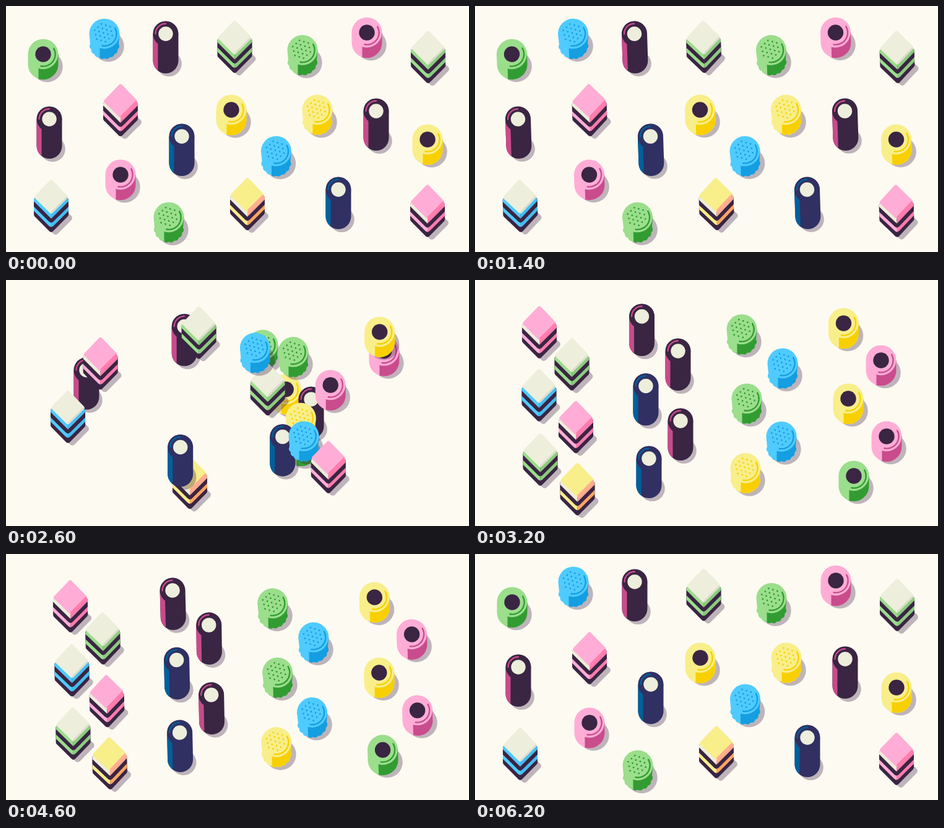
Animation, 748 px wide and 398 px high, one loop 6300 ms. Source, as an HTML page with a canvas:

```html
<!DOCTYPE html>
<html lang="en">
<head>
<meta charset="utf-8">
<title>Sorting sweets</title>
<style>
html, body { margin: 0; width: 100%; height: 100%; overflow: hidden; background: #fdfaf1; }
canvas { display: block; }
</style>
</head>
<body>
<canvas id="stage" width="748" height="398"></canvas>
<script>
const ctx = document.getElementById('stage').getContext('2d');
const LOOP = 6300, STEP = 100, MOVE = 500, GATHER = 2240, SCATTER = 5580, SWING = 767;
const TAU = Math.PI * 2;
const INK = '#3a2543', CREAM = '#edeedb', SHADOW = 'rgba(62,38,74,0.33)';

// Round sweets: [light, dark]
const TINT = {
  green: ['#9bde8c', '#329c32'],
  blue: ['#4fcbff', '#159ee0'],
  pink: ['#ffadd6', '#c94c8c'],
  yellow: ['#f8ee8a', '#f8d000']
};
// Tubes: [body, side]
const TUBE = { black: [INK, '#c84b8c'], navy: ['#303062', '#00609c'] };
// Cubes: top, bevel, first layer left/right, second layer left/right
const CUBE = {
  green: [CREAM, '#dcdccb', '#9bde8c', '#8ccb7e', '#9bde8c', '#8ccb7e'],
  blue: [CREAM, '#dcdccb', '#4fcbff', '#45bdf2', '#4fcbff', '#45bdf2'],
  pink: ['#ffadd6', '#ff7bac', CREAM, '#ff7bac', '#ffadd6', '#ff7bac'],
  yellow: ['#f8ee8a', '#ffab90', CREAM, '#ffab90', '#f8ee8a', '#ffa562']
};

// Back to front: draw, colour, scattered x y, sorted x y, lag, optional drift x y
const sweets = [
  [wheel, 'green', 60, 78, 607, 317, 55, 5, 0],
  [wheel, 'yellow', 364, 168, 603, 192, 134],
  [tube, 'black', 598, 170, 332, 228, 129],
  [wheel, 'pink', 583, 43, 665, 253, 140],
  [wheel, 'yellow', 681, 216, 595.5, 70, 4],
  [cube, 'yellow', 390, 306, 169, 324, 124, -3.5, 0],
  [bobble, 'green', 263, 342, 431, 80, 4],
  [tube, 'black', 258, 45, 328, 115, 122],
  [tube, 'black', 70, 183, 269.5, 59, 149],
  [bobble, 'yellow', 503, 168, 437, 304.5, 127],
  [tube, 'navy', 537, 297, 276, 171.5, 139],
  [tube, 'navy', 284, 211, 281, 289, 55],
  [cube, 'green', 682, 68, 110.5, 276, 118, -5, 0],
  [bobble, 'blue', 436.5, 235, 495, 258.5, 55, 0, -5],
  [bobble, 'blue', 159, 45, 497, 135, 66],
  [bobble, 'green', 479, 71.5, 439, 192, 133],
  [wheel, 'pink', 185, 273, 656, 130, 66],
  [cube, 'pink', 185, 154, 104, 70, 128],
  [cube, 'pink', 681, 317, 163, 223.5, 147],
  [cube, 'green', 369.5, 51.5, 156.5, 122, 156],
  [cube, 'blue', 73, 309, 108.5, 175, 55, -5, -3]
];

const clamp = v => Math.min(1, Math.max(0, v));
const ease = v => v < 0.5 ? 4 * v ** 3 : 1 - 4 * (1 - v) ** 3;

function disc(x, y, r, fill) {
  ctx.fillStyle = fill;
  ctx.beginPath();
  ctx.arc(x, y, r, 0, TAU);
  ctx.fill();
}

function arc(r, from, to, color, width) {
  ctx.strokeStyle = color;
  ctx.lineWidth = width;
  ctx.lineCap = 'round';
  ctx.beginPath();
  ctx.arc(0, 0, r, from, to);
  ctx.stroke();
}

function rounded(points, radius, fill) {
  const last = points[points.length - 1];
  ctx.beginPath();
  ctx.moveTo((last[0] + points[0][0]) / 2, (last[1] + points[0][1]) / 2);
  points.forEach((p, i) => {
    const next = points[(i + 1) % points.length];
    ctx.arcTo(...p, (p[0] + next[0]) / 2, (p[1] + next[1]) / 2, radius);
  });
  ctx.closePath();
  ctx.fillStyle = fill;
  ctx.fill();
}

function capsule(r, base) {
  ctx.beginPath();
  ctx.arc(0, 0, r, Math.PI, TAU);
  ctx.arc(0, base, r, 0, Math.PI);
  ctx.closePath();
}

// Same outline with a bumpy lower rim
function bumpyCapsule(r, base) {
  ctx.beginPath();
  ctx.arc(0, 0, r, Math.PI, TAU);
  for (let i = 0; i <= 72; i++) {
    const a = i / 72 * Math.PI;
    const rim = r - 1.5 + 1.5 * Math.abs(Math.sin(a * 8));
    ctx.lineTo(Math.cos(a) * rim, base + Math.sin(a) * rim);
  }
  ctx.closePath();
}

function drum(outline, [light, dark]) {
  disc(6.5, 20, 25.2, SHADOW);
  ctx.save();
  outline(24.5, 16.5);
  ctx.fillStyle = light;
  ctx.fill();
  ctx.clip();
  ctx.fillStyle = dark;
  ctx.fillRect(-7.5, 0, 40, 50);
  disc(0, 0, 24.2, light);
  ctx.restore();
  arc(19.6, -0.5, 1.75, dark, 2.4);
}

function wheel(color) {
  drum(capsule, TINT[color]);
  disc(0, 0, 12.7, INK);
}

function bobble(color) {
  drum(bumpyCapsule, TINT[color]);
  ctx.save();
  ctx.translate(-1.5, -1.5);
  ctx.rotate(0.3);
  for (let row = -3; row <= 3; row++) {
    for (let col = -3; col <= 3; col++) {
      const x = (col + row % 2 / 2) * 7.4, y = row * 6.4;
      if (Math.hypot(x, y) < 18) disc(x, y, 1.4, TINT[color][1]);
    }
  }
  ctx.restore();
}

function tube(color) {
  const [body, side] = TUBE[color];
  disc(5.3, 48.5, 20.5, SHADOW);
  ctx.save();
  capsule(20.5, 43.5);
  ctx.fillStyle = body;
  ctx.fill();
  ctx.clip();
  ctx.fillStyle = side;
  ctx.fillRect(-21, 0, 8.5, 70);
  disc(0, 0, 20.5, body);
  ctx.restore();
  arc(16.5, Math.PI, Math.PI * 1.5, side, 2.3);
  disc(0, 0, 11.7, CREAM);
}

// Half of a layer: a slanted band that bends softly at the middle
function layer(side, top, bottom, fill) {
  ctx.fillStyle = fill;
  ctx.beginPath();
  ctx.moveTo(0, 26 + top);
  ctx.lineTo(side, top - 2);
  ctx.lineTo(side, bottom);
  ctx.lineTo(side * 0.14, 24 + bottom);
  ctx.quadraticCurveTo(side * 0.07, 26 + bottom, 0, 26 + bottom);
  ctx.fill();
}

function cube(color) {
  const [top, bevel, ...layers] = CUBE[color];
  const w = 28;
  rounded([[7, 5], [36, 34], [7, 63], [-22, 34]], 5, SHADOW);
  ctx.save();
  rounded([[-w, 1], [w, 1], [w, 30], [0, 58.5], [-w, 30]], 4, INK);
  ctx.clip();
  layers.forEach((fill, i) => {
    const [from, to] = i < 2 ? [0, 9] : [15.5, 22.5];
    layer(i % 2 ? w : -w, from, to, fill);
    if (i > 1) layer(i % 2 ? w : -w, 9, 15.5, INK);
  });
  ctx.restore();
  rounded([[0, -29], [w, 0], [0, 28], [-w, 0]], 3.5, top);
  ctx.strokeStyle = bevel;
  ctx.lineWidth = 3;
  ctx.lineCap = 'round';
  ctx.beginPath();
  ctx.moveTo(1.5, 24.5);
  ctx.lineTo(25, 1);
  ctx.stroke();
}

function tilt(t, i) {
  if (t < SWING * 3) return 2 * Math.sin(TAU * t / SWING);
  const start = 3200 - SWING / 2;
  if (t < start || t > 3200 + SWING * 3) return 0;
  return (1.2 + 0.6 * Math.cos(i * 2.4)) * Math.sin(TAU * (t - 3200) / SWING);
}

function render(t) {
  ctx.fillStyle = '#fdfaf1';
  ctx.fillRect(0, 0, 748, 398);
  const drift = clamp((t - 2650) / 250) * clamp((5550 - t) / 2350);
  sweets.forEach(([draw, color, x0, y0, x1, y1, lag, dx = 0, dy = 0], i) => {
    const p = ease(clamp((t - GATHER - lag) / MOVE)) - ease(clamp((t - SCATTER - lag * 0.7) / MOVE));
    ctx.save();
    ctx.translate(x0 + (x1 - x0) * p + dx * drift, y0 + (y1 - y0) * p + dy * drift + 16);
    ctx.rotate(tilt(t, i) * Math.PI / 180);
    ctx.translate(0, -16);
    draw(color);
    ctx.restore();
  });
}

const began = performance.now();
function tick() {
  const t = (performance.now() - began) % LOOP;
  render(Math.floor(t / STEP) * STEP);
  requestAnimationFrame(tick);
}
tick();
</script>
</body>
</html>
```
